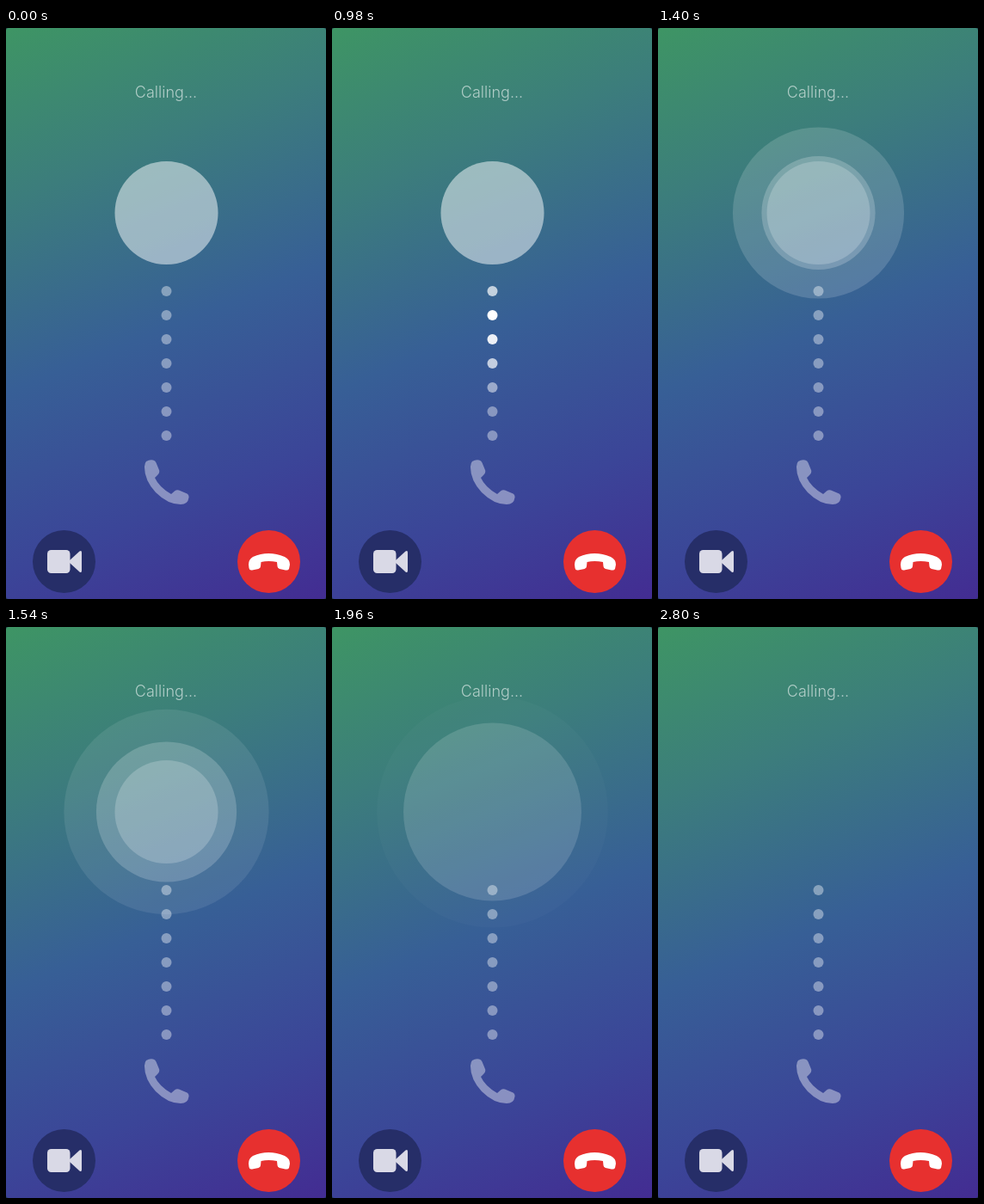
Recreate the animation shown at these times as an HTML page. Size 372 by 664 pixels, loop 2870 ms.

```html
<!DOCTYPE html>
<html lang="en">
<head>
<meta charset="utf-8">
<title>Calling</title>
<style>
  html, body { margin: 0; width: 100%; height: 100%; overflow: hidden; background: #1c3a48; }
  svg { display: block; width: 372px; height: 664px; }
  text { font: 300 18px Inter, "Open Sans", sans-serif; }
</style>
</head>
<body>
<svg id="stage" viewBox="0 0 372 664">
  <defs>
    <linearGradient id="sky" gradientUnits="userSpaceOnUse" x1="45" y1="-20" x2="327" y2="684">
      <stop offset="0" stop-color="#3e9564"/>
      <stop offset=".25" stop-color="#3c7d7c"/>
      <stop offset=".52" stop-color="#375f96"/>
      <stop offset=".78" stop-color="#3b4598"/>
      <stop offset="1" stop-color="#432c92"/>
    </linearGradient>
  </defs>
  <rect width="372" height="664" rx="3" fill="url(#sky)"/>
  <text x="186" y="81" text-anchor="middle" fill="#fff" fill-opacity=".6">Calling...</text>
  <g id="rings" fill="#fff"></g>
  <g id="dots" fill="#fff"></g>
  <path id="phone" fill="#fff" d="M163 504Q167 501.500 171 502.500Q173.500 503 174.500 505.500L178 514Q179 517 176.500 519.500L173 523Q178 534 192 542L196 538.500Q198.500 536.500 201 537.500L210.500 541.500Q213 543 212.500 546Q211.500 554 203 554Q188 554 174 540Q161 526 161 511Q161 506 163 504Z"/>
  <circle cx="67.500" cy="620.500" r="36.500" fill="#262e68"/>
  <g fill="#d9d9e6">
    <rect x="48" y="607" width="26.500" height="27" rx="4.500"/>
    <path d="M74 619L85.500 608.500Q88 607 88 610V631Q88 634 85.500 632.500L74 622Z"/>
  </g>
  <circle cx="305.500" cy="620.500" r="36.500" fill="#e7302f"/>
  <path fill="#fff" d="M282 624Q282 618 287 615Q305 607 324 615Q330 618 330 624L329 629Q328 631 325 630.500L318 629Q315.500 628 315.500 626L315 621Q305 619 296.500 621L296 626Q296 628 293.500 629L286 630.500Q283 631 282.500 628Z"/>
</svg>
<script>
const LOOP = 2870, STEP = 70;
const CENTER_X = 186.5;
const DIM = 0.4;
const byId = id => document.getElementById(id);

function addCircles(parent, count, cy, r) {
  return Array.from({ length: count }, (_, i) => {
    const circle = document.createElementNS("http://www.w3.org/2000/svg", "circle");
    circle.setAttribute("cx", CENTER_X);
    circle.setAttribute("cy", cy(i));
    circle.setAttribute("r", r);
    return parent.appendChild(circle);
  });
}

const rings = addCircles(byId("rings"), 3, () => 215, 60);
const dots = addCircles(byId("dots"), 7, i => 474 - 28 * i, 6);
const phone = byId("phone");

// Eased progress from 0 to 1 between two times.
function ease(t, from, to) {
  const p = Math.min(1, Math.max(0, (t - from) / (to - from)));
  return p * p * (3 - 2 * p);
}

function glow(t, start, bright, fade) {
  return DIM + (1 - DIM) * (ease(t, start, bright) - ease(t, fade, fade + 340));
}

function render(t) {
  phone.setAttribute("opacity", glow(t, 0, 200, 476));
  const angle = t < 640 ? 12 * Math.sin(2 * Math.PI * t / 320) : 0;
  phone.setAttribute("transform", `rotate(${angle} 187 528)`);

  dots.forEach((dot, i) => {
    const peak = 560 + 84 * i;
    dot.setAttribute("opacity", glow(t, peak - 168, peak, peak));
  });

  rings.forEach((ring, i) => {
    const start = 996 + i * 800 / 3;
    const grown = ease(t, start, start + 800);
    ring.setAttribute("r", 60 + 78 * grown);
    ring.setAttribute("opacity", 0.205 * (1 - grown * grown));
  });
}

const origin = performance.now();
function tick() {
  const t = (performance.now() - origin) % LOOP;
  render(Math.floor(t / STEP) * STEP);
  requestAnimationFrame(tick);
}
tick();
</script>
</body>
</html>
```
